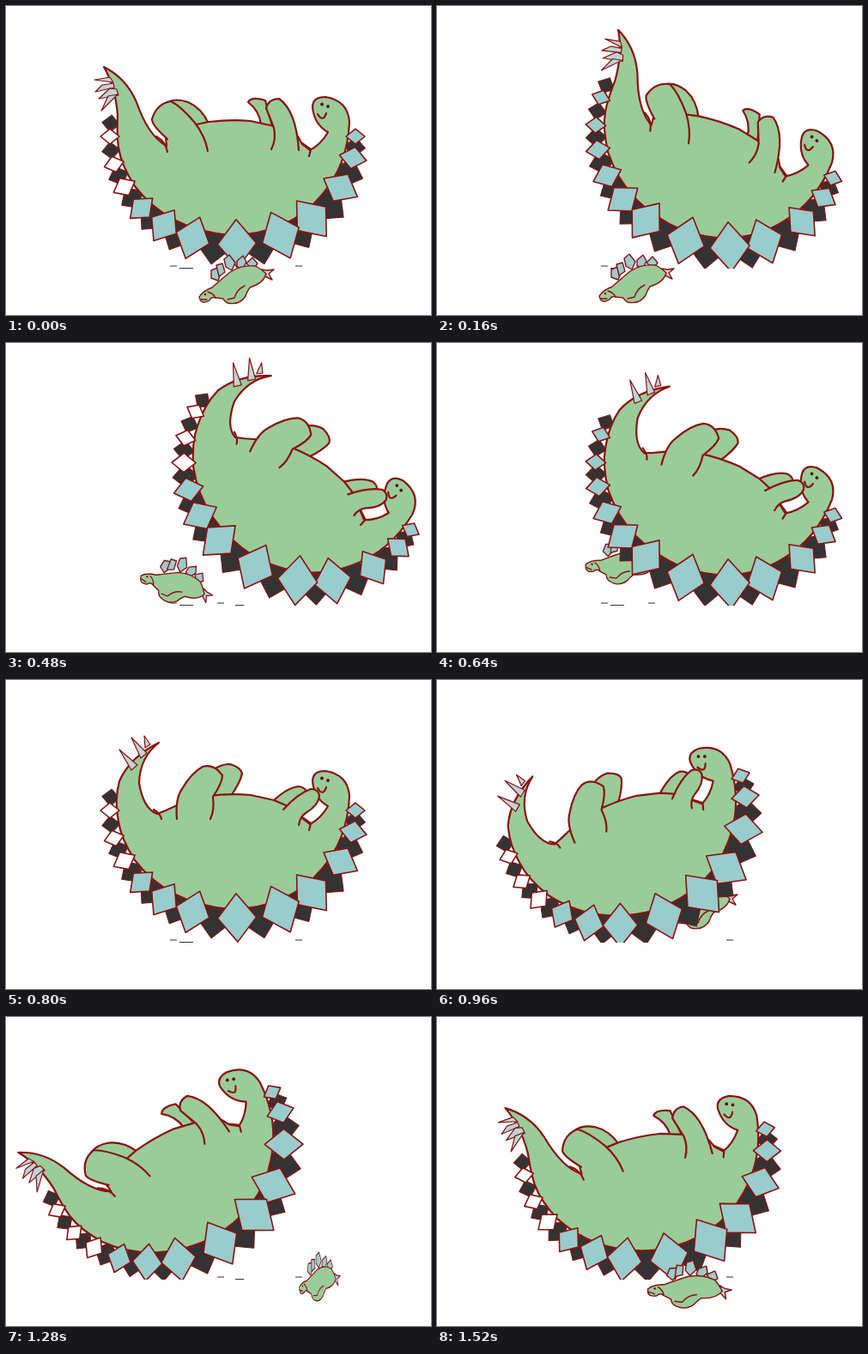
Write an HTML page that moves like this. It is 495 px wide and 360 px high and loops after 1600 ms.

```html
<!DOCTYPE html>
<html lang="en">
<head>
<meta charset="utf-8">
<title>Rocking stegosaurus</title>
<style>
  html, body { margin: 0; width: 100%; height: 100%; overflow: hidden; background: #fff; }
  svg { display: block; width: 495px; height: 360px; }
  path, polygon { fill: #9c9; stroke: #8c1010; stroke-width: 2.2; stroke-linejoin: round; stroke-linecap: round; }
  .line { fill: none; }
  .plate, .spike { fill: #9cc; stroke-width: 1.6; }
  .spike { fill: #bdd5d8; stroke-width: 1.2; }
  .dark { fill: #333; stroke-width: 1; }
  .eye { fill: #5c1010; }
  #baby path, #baby polygon { stroke-width: 1.4; }
</style>
</head>
<body>
<svg viewBox="0 0 495 360">
  <clipPath id="floor"><rect width="495" height="306"/></clipPath>
  <g id="specks" fill="#333"></g>
  <g id="stage">
    <g id="adult" clip-path="url(#floor)">
      <g id="roll">
        <g id="darkPlates"></g>
        <g class="up">
          <path d="M188 112Q198 107 212 112Q228 119 236 137L210 150"/>
          <path d="M297 138Q295 122 282 112Q286 105 302 110L310 140"/>
        </g>
        <g class="down">
          <path d="M235 112Q245 98 261 98Q274 102 275 109Q273 119 262 135L236 140"/>
          <path d="M311 141Q328 125 341 124Q349 125 351 132L330 152"/>
        </g>
        <path id="body"/>
        <g id="plates"></g>
        <g class="up">
          <path d="M188 155Q170 139 170 132Q175 114 192 111Q204 117 220 136Q232 152 235 169"/>
          <path class="line" d="M175 152Q186 158 188 170"/>
          <path d="M309 167Q315 155 312 142L303 119Q306 108 318 108Q338 122 341 168"/>
          <polygon class="spike" points="103,86 121,83 125,89"/>
          <polygon class="spike" points="104,100 112,92 125,90 126,95"/>
          <polygon class="spike" points="108,108 121,96 129,97 131,104"/>
          <polygon class="spike" points="111,122 119,105 130,103"/>
        </g>
        <g class="down">
          <path d="M199 162Q197 138 205 127Q216 108 229 101Q242 97 252 111Q252 120 241 136Q243 152 238 162"/>
          <path class="line" d="M172 151Q180 156 181 162"/>
          <path d="M323 151Q340 132 355 127Q364 127 365 135Q364 146 349 155Q342 160 341 169"/>
          <polygon class="spike" points="132,81 153,99 146,105"/>
          <polygon class="spike" points="146,67 164,85 157,91"/>
          <polygon class="spike" points="161,65 168,75 162,79"/>
        </g>
        <path class="line" d="M345 160L355 167L353 175"/>
        <circle class="eye" cx="368" cy="114.5" r="1.9"/>
        <circle class="eye" cx="375" cy="117" r="1.9"/>
        <path class="line" d="M363 126Q369 136 373 125"/>
      </g>
    </g>
    <g id="baby">
      <polygon class="plate" points="-28,-12 -21,-15 -17,-8 -20,0 -28,-3"/>
      <polygon class="plate" points="-22,-18 -15,-20 -12,-10 -19,-5"/>
      <polygon class="plate" points="-13,-25 -7,-30 0,-21 -4,-12 -11,-16"/>
      <polygon class="plate" points="2,-23 9,-29 13,-22 9,-14 2,-16"/>
      <polygon class="plate" points="13,-20 20,-27 26,-20 21,-13"/>
      <polygon class="spike" points="31,-13 37,-12 45,-13 39,-8 43,-1 35,-5"/>
      <path d="M-42 19Q-38 12 -27 8Q-18 0 -6 -10Q8 -19 24 -17Q31 -13 36 -8Q33 3 17 8Q14 12 12 18Q5 29 -9 26Q-13 24 -14 21L-22 20Q-28 18 -30 23Q-38 28 -41 22Z"/>
      <path class="line" d="M11 6Q2 10 -1 20L-9 22M-32 13Q-25 15 -23 20M-40 22L-33 22"/>
      <circle class="eye" cx="-35" cy="16" r="1.2"/>
    </g>
  </g>
</svg>
<script>
const STEP = 80, LOOP = 1600;
const $ = id => document.getElementById(id);
const show = (node, visible) => node.style.display = visible ? '' : 'none';
const add = (parent, tag, attrs) => {
  const node = document.createElementNS('http://www.w3.org/2000/svg', tag);
  for (const name in attrs) node.setAttribute(name, attrs[name]);
  return $(parent).appendChild(node);
};

const torso = 'M186 152Q212 139 236 135Q262 132 285 134L312 140L340 152L345 161L354 168Q367 161 375 147Q359 138 357 118Q357 106 372 106Q398 110 400 135Q398 185 368 220Q330 266 262 267Q190 262 150 210Q134 185 131 165';
const tails = {
  up: 'Q129 150 130 128Q128 95 114 71Q140 84 152 112Q166 152 187 163Z',
  down: 'Q126 140 132 118Q144 90 178 73Q156 90 155 120Q160 150 176 156Z'
};

// Diamond plates stand along an ellipse around the back, largest near the middle
const angles = [0, 11.5, 28.5, 50, 67, 88, 109, 124, 138, 152, 165, 180, 194];
const plateSize = s => 11 + 18 * Math.sin(Math.PI * Math.min(s, 1) ** 0.72) ** 2;

function addPlate(parent, className, degrees, length, width) {
  const a = degrees * Math.PI / 180, cos = Math.cos(a), sin = Math.sin(a);
  const corners = [[-length, 0], [0, width], [length, 0], [0, -width]].map(([out, side]) =>
    [264 + 143 * cos + out * cos - side * sin, 152 + 125 * sin + out * sin + side * cos]);
  return add(parent, 'polygon', { class: className, points: corners.join(' ') });
}

const plates = angles.slice(0, 12).map((angle, i) => {
  const size = plateSize(i / 11), between = plateSize((i + 0.5) / 11);
  addPlate('darkPlates', 'dark', (angle + angles[i + 1]) / 2, between * 0.95, between * 0.9);
  return addPlate('plates', 'plate', angle, size, size * 0.8);
});

const specks = [[191, 8], [202, 16], [246, 8], [267, 10], [337, 8]].map(([x, width], i) =>
  ({ x, node: add('specks', 'rect', { x, y: i % 2 ? 305 : 302.5, width, height: 1 }) }));

// Baby: time, x, y, angle, width
const babyKeys = [
  [0, 267, 320, 0, 1], [160, 231, 319, 0, 1], [320, 182, 302, 47, 0.9], [640, 217, 256, 22, 0.95],
  [960, 305, 263, 0, 1], [1280, 365, 305, 12, 0.52], [1520, 294, 314, 21, 1.05], [LOOP, 267, 320, 0, 1]
];

function babyAt(t) {
  const i = babyKeys.findIndex(key => key[0] > t);
  const a = babyKeys[i - 1], b = babyKeys[i], k = (t - a[0]) / (b[0] - a[0]);
  return a.map((value, j) => value + (b[j] - value) * k);
}

// Quadratic swing from -1 to 1, peaking at a quarter of the loop
function swing(t) {
  const half = LOOP / 2, p = (t % half) / half * 2 - 1;
  return (1 - p * p) * (t < half ? 1 : -1);
}

function draw(t) {
  const u = swing(t), bump = Math.abs(u) * (1 - Math.abs(u));
  const x = 264 + 84 * u + 36 * bump, y = 152 - 4 * u + 18 * bump;
  $('roll').setAttribute('transform', `translate(${x} ${y}) rotate(${30 * u}) translate(-264 -152)`);

  const pose = t > 400 && t <= 1200 ? 'down' : 'up';
  $('body').setAttribute('d', torso + tails[pose]);
  for (const name in tails)
    document.querySelectorAll('.' + name).forEach(g => show(g, name === pose));

  // Tail plates glint white, specks show just beside the adult
  plates.forEach((plate, i) => plate.style.fill = i > 8 && (u < 0.5 || u > 0.9) ? '#fff' : '');
  specks.forEach(speck => {
    const distance = Math.abs(speck.x - x);
    show(speck.node, distance > 60 && distance < 160);
  });

  const [, babyX, babyY, angle, width] = babyAt(t);
  $('baby').setAttribute('transform', `translate(${babyX} ${babyY}) scale(${width} 1) rotate(${angle})`);
  const hidden = t > 400 && t < 1200;
  $('stage').append(...(hidden ? [$('baby'), $('adult')] : [$('adult'), $('baby')]));
}

let shown = -1;
function tick() {
  const t = Math.floor(performance.now() % LOOP / STEP) * STEP;
  if (t !== shown) draw(shown = t);
  requestAnimationFrame(tick);
}
tick();
</script>
</body>
</html>
```
